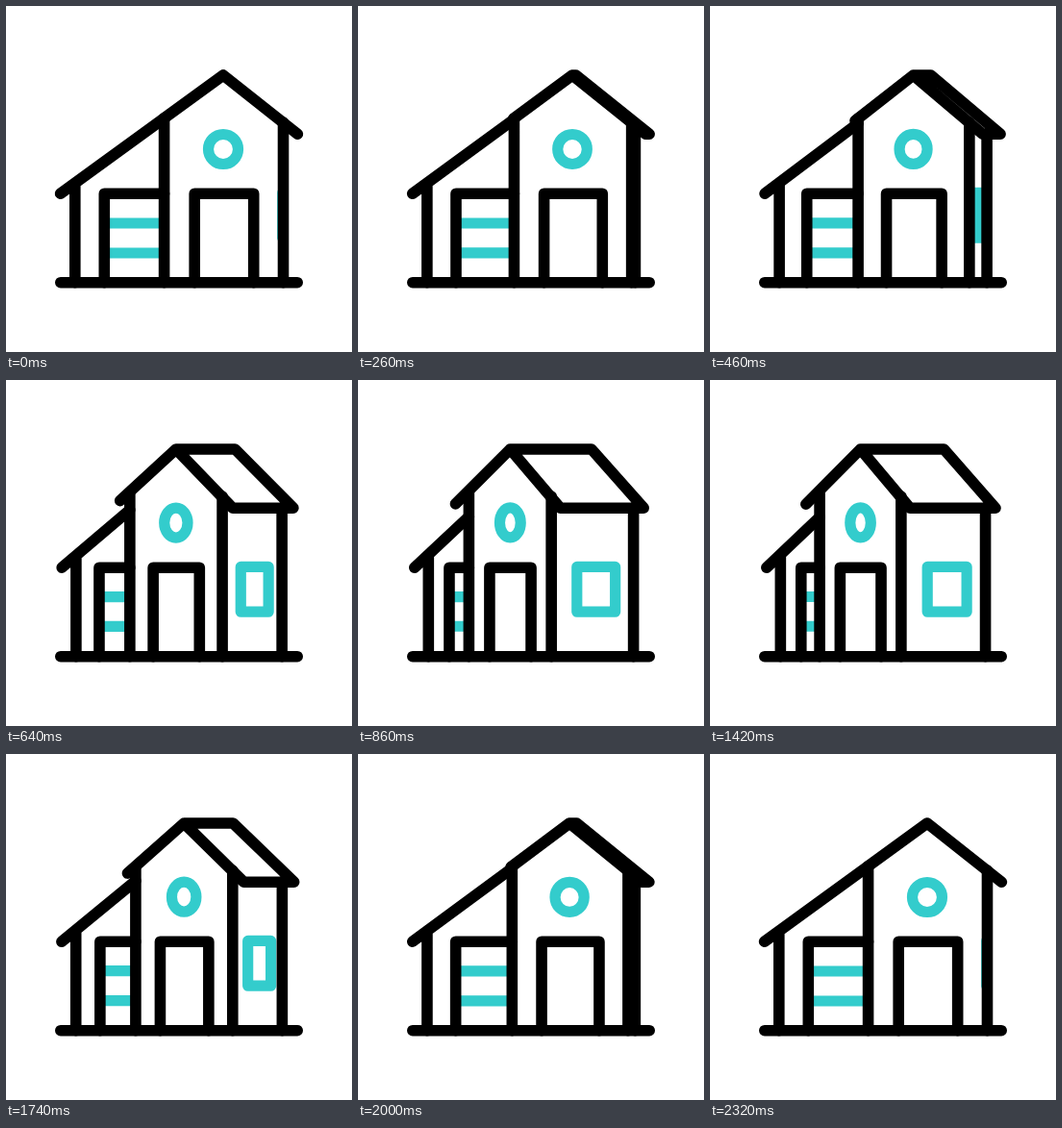
Animation of 360x360 px, one loop 2.34 s. Source, as an HTML page:

```html
<!DOCTYPE html>
<html lang="en">
<head>
<meta charset="utf-8">
<title>Turning house</title>
<style>
  html, body { margin: 0; width: 100%; height: 100%; overflow: hidden; background: #fff; }
  svg { display: block; width: 100%; height: 100%; }
  g { fill: none; stroke-linejoin: round; }
  .teal { stroke: #33cccc; stroke-width: 11.2; }
  .ink { stroke: #000; stroke-width: 11.6; stroke-linecap: round; }
</style>
</head>
<body>
<svg viewBox="0 0 360 360">
  <g class="teal">
    <path id="stripes"/>
    <path id="pane"/>
    <ellipse id="ring"/>
  </g>
  <g class="ink">
    <path id="shed"/>
    <path id="roof"/>
    <path id="walls"/>
    <path id="doors"/>
    <path d="M56.8 287.7H303.2"/>
  </g>
</svg>
<script>
const LOOP = 2340, TURN = 1160, STEP = 20;
const GROUND = 287.7, RIDGE = 72, EAVE = 133.2, LINTEL = 195.2;
const el = id => document.getElementById(id);
const path = (id, d) => el(id).setAttribute('d', d);

// Symmetric ease with control points (k, 0) and (1 - k, 1)
function ease(x, k = 0.75) {
  let lo = 0, hi = 1;
  for (let i = 0; i < 30; i++) {
    const s = (lo + hi) / 2, r = 1 - s;
    if (3 * k * s * r * r + 3 * (1 - k) * s * s * r + s ** 3 < x) lo = s;
    else hi = s;
  }
  return lo * lo * (3 - 2 * lo);
}

// p: 0 = facing front, 1 = fully turned
function draw(p) {
  const at = (start, change) => start + change * p;

  const peak = at(226, -71.9), back = at(226, 18);
  const eaveFront = at(303.4, -98.7), eaveBack = at(303.4, -6.6);
  const wallL = at(164.6, -52.3), wallR = at(288.5, -92.8), wallFar = at(288.5, -2);

  // Lean-to on the left
  const shedX = at(56.6, 2.3), shedTop = at(116.7, 27);
  const post = at(71.8, 1.6);
  const postTop = LINTEL + (shedTop - LINTEL) * (post - shedX) / (wallL - shedX);
  const gate = at(102.3, -7.8);
  path('shed', `M${shedX} ${LINTEL}L${wallL} ${shedTop}` +
    `M${post} ${postTop}V${GROUND}` +
    `M${gate} ${GROUND}V${LINTEL}H${wallL}`);
  path('stripes', [at(226, -0.5), at(257, -0.8)]
    .map(y => `M${gate} ${y}H${wallL}`).join(''));

  // Main house
  path('roof', `M${at(164.5, -67)} ${at(116.7, 13)}L${peak} ${RIDGE}H${back}` +
    `L${eaveBack} ${EAVE}H${eaveFront}L${peak} ${RIDGE}`);
  path('walls', `M${wallL} 117V${GROUND}M${wallR} 121V${GROUND}M${wallFar} ${EAVE}V${GROUND}`);
  path('doors', `M${at(196.2, -63)} ${GROUND}V${LINTEL}H${at(257.7, -82.5)}V${GROUND}`);

  const paneL = at(288, -64), paneR = at(287.7, -21.3);
  path('pane', `M${paneL} 194.4H${paneR}V241.2H${paneL}Z`);

  const ring = { cx: peak, cy: at(149, -0.6), rx: at(15.5, -4.9), ry: 15.5 };
  for (const k in ring) el('ring').setAttribute(k, ring[k]);
}

function tick() {
  const t = Math.floor(performance.now() % LOOP / STEP) * STEP;
  draw(ease(Math.min(t, LOOP - t, TURN) / TURN));
  requestAnimationFrame(tick);
}
tick();
</script>
</body>
</html>
```
